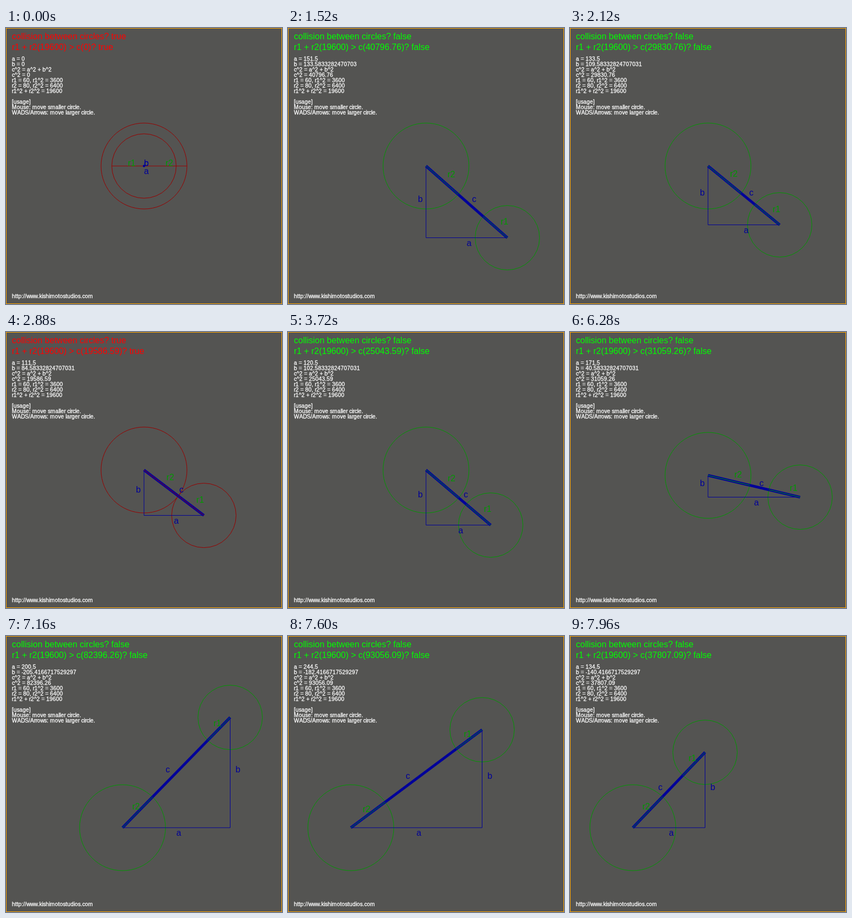
An HTML page with a canvas for the animation above (8000 ms loop, 514 by 514 pixels).

```html
<!DOCTYPE html>
<html lang="en">
<head>
<meta charset="utf-8">
<title>Circle collision</title>
<style>
  html, body { margin: 0; width: 100%; height: 100%; overflow: hidden; background: #545452; }
  canvas { display: block; }
</style>
</head>
<body>
<canvas id="stage" width="514" height="514"></canvas>
<script>
const ctx = document.getElementById('stage').getContext('2d');
const LOOP = 8000, TICK = 40, HOME = 257, ENTER = 520;
const R1 = 60, R2 = 80, LIMIT = (R1 + R2) ** 2;
const FRAC_Y = 0.5833282470703125; // sub-pixel part of the pointer position
const BACK = '#545452', BLUE = '#000099', GREEN = '#009900', RED = '#990000';
const FACE = '"Liberation Sans", Arial, sans-serif';

// Where the pointer comes to rest: arrival time, x, y
const stops = [
  [ENTER, 424, 490], [640, 429, 425], [1520, 408, 390], [1800, 391, 368],
  [2360, 373, 349], [2880, 368, 341], [3880, 386, 377], [4920, 393, 376],
  [5240, 428, 307], [7120, 417, 151], [7680, 342, 181], [7960, 251, 216]
];

// A glide takes 10 ms per pixel, at most 320 ms, and ends on its arrival time
function pointer(t) {
  if (t < ENTER) return { x: HOME, y: HOME };
  let [from, x, y] = stops[0];
  for (const [end, tx, ty] of stops.slice(1)) {
    const dx = tx - x, dy = ty - y;
    const start = Math.max(from, end - Math.min(320, Math.hypot(dx, dy) * 10));
    if (t <= start) break;
    const k = Math.min(1, (t - start) / (end - start));
    x += dx * k;
    y += dy * k;
    if (k < 1) break;
    from = end;
  }
  return { x: Math.round(x) + 0.5, y: Math.round(y) + FRAC_Y };
}

// Repeats of a held key so far
const presses = (t, start, count, every) =>
  Math.max(0, Math.min(count, Math.floor((t - start) / every) + 1));

function keyed(t) {
  const down = presses(t, 6280, 7, 26) + presses(t, 6600, 3, 26);
  const left = presses(t, 7040, 14, 40);
  return { x: HOME - 10 * left, y: HOME + 10 * down };
}

function line(x1, y1, x2, y2, color, width = 1) {
  ctx.strokeStyle = color;
  ctx.lineWidth = width;
  ctx.beginPath();
  ctx.moveTo(x1, y1);
  ctx.lineTo(x2, y2);
  ctx.stroke();
}

function ring(p, r, color) {
  ctx.strokeStyle = color;
  ctx.lineWidth = 1;
  ctx.beginPath();
  ctx.arc(p.x, p.y, r, 0, Math.PI * 2);
  ctx.stroke();
}

function dot(p) {
  ctx.fillStyle = BLUE;
  ctx.beginPath();
  ctx.arc(p.x, p.y, 2.2, 0, Math.PI * 2);
  ctx.fill();
}

function label(s, x, y, color) {
  ctx.font = '16px ' + FACE;
  ctx.fillStyle = color;
  ctx.fillText(s, x, y);
}

// Small print sits on whole-pixel glyph advances
function small(s, y) {
  ctx.font = '10.3px ' + FACE;
  ctx.fillStyle = ctx.strokeStyle = '#fff';
  ctx.lineWidth = 0.3;
  let x = 11;
  for (const ch of s) {
    ctx.fillText(ch, x, y);
    ctx.strokeText(ch, x, y);
    x += Math.round(ctx.measureText(ch).width);
  }
}

function drawShapes(big, tip, a, b, hit) {
  const tone = hit ? RED : GREEN;
  const angle = Math.atan2(b, a), ux = Math.cos(angle), uy = Math.sin(angle);
  const mx = (big.x + tip.x) / 2, my = (big.y + tip.y) / 2;
  const corner = b > 0 ? { x: big.x, y: tip.y } : { x: tip.x, y: big.y };
  const apart = a !== 0 || b !== 0;

  ring(big, R2, tone);
  ring(tip, R1, tone);
  if (apart) {
    line(big.x, corner.y, tip.x, corner.y, BLUE);
    line(corner.x, big.y, corner.x, tip.y, BLUE);
    line(big.x, big.y, tip.x, tip.y, BLUE, 5);
  }
  line(big.x, big.y, big.x + ux * R2, big.y + uy * R2, tone);
  line(tip.x, tip.y, tip.x - ux * R1, tip.y - uy * R1, tone);
  if (!apart) dot(big);

  const side = Math.sign(b);
  const rx = side * 10, ry = side ? -5 : 0;
  label('r1', tip.x - ux * R1 / 2 + rx, tip.y - uy * R1 / 2 + ry, GREEN);
  label('r2', big.x + ux * R2 / 2 + rx, big.y + uy * R2 / 2 + ry, GREEN);
  label('a', mx, corner.y + 15, BLUE);
  label('b', corner.x + (side > 0 ? -15 : side * -10), my, BLUE);
  label('c', mx + (side < 0 ? -20 : side * 10), my, BLUE);
}

function drawText(a, b, c2, hit) {
  const bright = hit ? '#ff0000' : '#00ff00';
  label('collision between circles? ' + hit, 11, 21, bright);
  label(`r1 + r2(${LIMIT}) > c(${c2})? ${hit}`, 11, 41, bright);
  [
    'a = ' + a,
    'b = ' + b,
    'c^2 = a^2 + b^2',
    'c^2 = ' + c2,
    `r1 = ${R1}, r1^2 = ${R1 * R1}`,
    `r2 = ${R2}, r2^2 = ${R2 * R2}`,
    'r1^2 + r2^2 = ' + LIMIT,
    '',
    '[usage]',
    'Mouse: move smaller circle.',
    'WADS/Arrows: move larger circle.'
  ].forEach((s, i) => small(s, 61 + i * 10));
  small('http://www.kishimotostudios.com', 503);
}

function draw(t) {
  const big = keyed(t), tip = pointer(t);
  const a = tip.x - big.x, b = tip.y - big.y;
  const c2 = Math.round((a * a + b * b) * 100) / 100;
  const hit = c2 < LIMIT;

  ctx.fillStyle = BACK;
  ctx.fillRect(0, 0, 514, 514);
  drawShapes(big, tip, a, b, hit);
  drawText(a, b, c2, hit);
  ctx.strokeStyle = '#ffa500';
  ctx.lineWidth = 1;
  ctx.strokeRect(0.5, 0.5, 513, 513);
}

const begin = performance.now();
function frame() {
  const t = (performance.now() - begin) % LOOP;
  draw(Math.floor(t / TICK) * TICK);
  requestAnimationFrame(frame);
}
frame();
</script>
</body>
</html>
```
